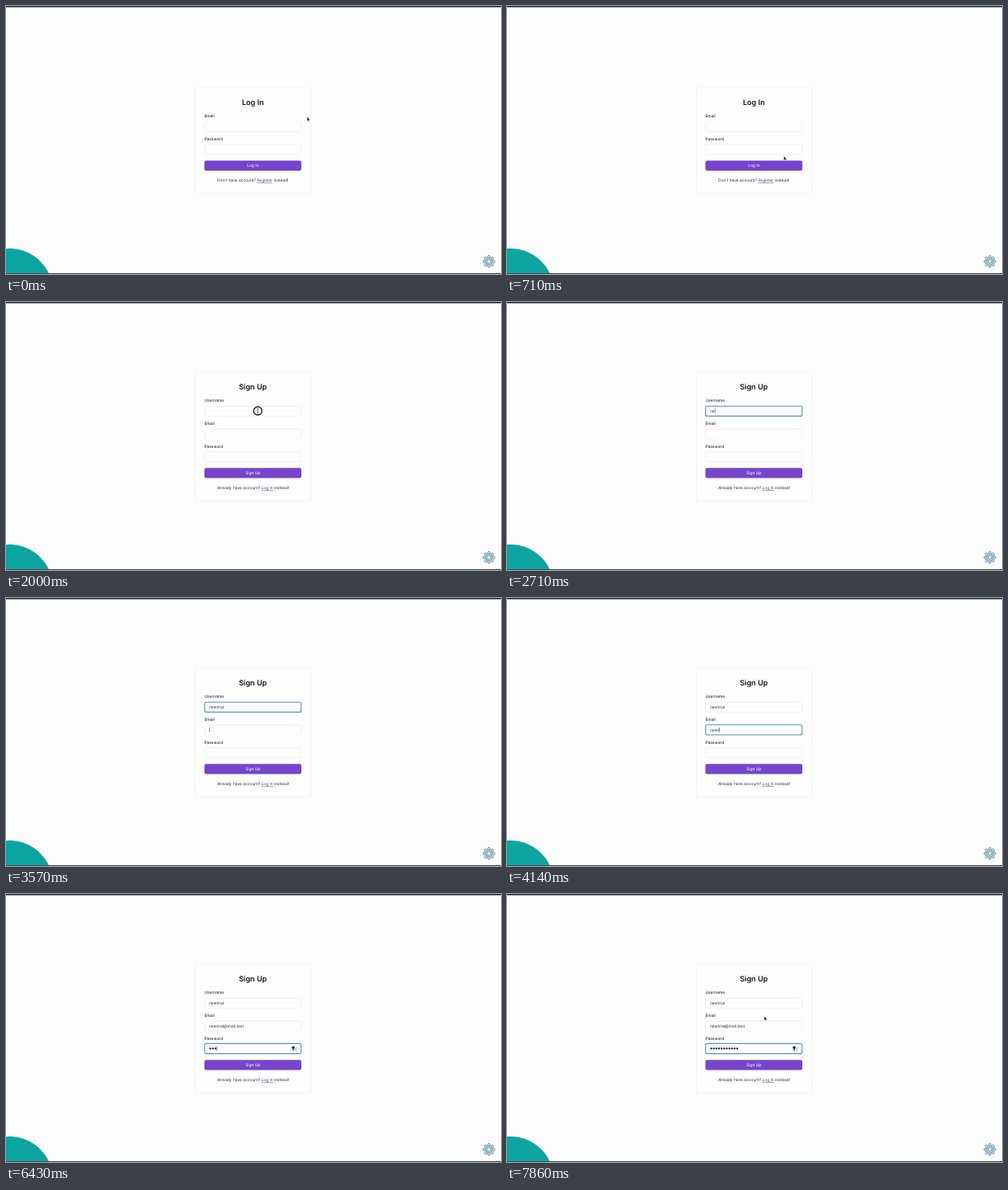
An HTML page that plays this animation: 600 px wide and 325 px high, repeating every 8000 ms.

```html
<!DOCTYPE html>
<html lang="en">
<head>
<meta charset="utf-8">
<title>Sign up form</title>
<style>
  html, body { margin: 0; width: 100%; height: 100%; overflow: hidden; background: #fefdfe; }
  svg { display: block; width: 100vw; height: 100vh; }
  text { font: 4.85px Inter, Roboto, sans-serif; fill: #2d2d38; text-rendering: geometricPrecision; }
  .title { font-size: 9px; font-weight: 600; fill: #17171c; text-anchor: middle; }
  .label { font-weight: 500; }
  .action { font-weight: 500; fill: #f4efff; text-anchor: middle; }
  .link { fill: #4c3a78; text-decoration: underline; }
  .card { fill: #fefefe; stroke: #f3f2f8; stroke-width: 1; }
  .field { fill: #fefefe; stroke: #eeeef3; stroke-width: .8; }
  .focus { fill: none; stroke: #5f96b5; stroke-width: 1.1; }
  .caret { fill: #333; }
</style>
</head>
<body>
<svg id="stage" viewBox="0 0 600 325" preserveAspectRatio="none">
  <rect width="600" height="325" fill="#fefdfe"/>
  <rect width="600" height="1.5" fill="#26252b"/>
  <circle cx="4" cy="347" r="53" fill="#0ca5a2"/>
  <rect y="324" width="600" height="1" fill="#4a4d52"/>
  <g transform="translate(585.3 309.8)" stroke="#66899a" stroke-width=".8" stroke-linejoin="round">
    <path id="gear" fill="#bfdfe8"/>
    <circle r="4.3" fill="#a9d2de"/>
    <circle r="2.3" fill="#fdfeff"/>
  </g>

  <g id="login"></g>
  <g id="signup"></g>

  <g id="key">
    <rect x="345" y="183.8" width="8" height="7" rx="1.5" fill="#e5e7ea"/>
    <circle cx="348.2" cy="186.2" r="1.6" fill="#25272b"/>
    <path d="M348.2 187V190" stroke="#25272b" stroke-width="1.1"/>
    <circle cx="351" cy="188.3" r=".7" fill="#92979d"/>
  </g>

  <path id="arrow" d="M0 0V5.2L1.2 4.1L2 5.9L2.9 5.5L2.1 3.8H3.7Z" fill="#111" stroke="#fff" stroke-width=".4"/>
  <path id="hand" d="M0 0Q.6-.7 1.2 0V2L3.4 2.6Q4 2.8 3.8 4L3.3 6H.7L-1.3 3.4Q-1.2 2.5 0 3.2Z"
        fill="#fff" stroke="#33303b" stroke-width=".6"/>
  <g id="beam" fill="none" stroke="#1c1c20">
    <circle r="5" stroke-width="1.3"/>
    <path d="M0-2.5V2.5M-.8-2.7H.8M-.8 2.7H.8" stroke-width=".7"/>
  </g>
</svg>
<script>
const LOOP = 8000;
const USERNAME = 'newtrial';
const EMAIL = 'newtrial@mail.test';
const $ = id => document.getElementById(id);
const clamp = v => Math.max(0, Math.min(1, v));
const ease = v => v * v * (3 - 2 * v);

// Piecewise interpolation through [time, value] points.
function track(points, t, shape = v => v) {
  if (t <= points[0][0]) return points[0][1];
  for (let i = 1; i < points.length; i++) {
    const [t0, a] = points[i - 1], [t1, b] = points[i];
    if (t < t1) return a + (b - a) * shape((t - t0) / (t1 - t0));
  }
  return points[points.length - 1][1];
}

function buildForm(id, top, title, labels, footer) {
  const height = 73 + labels.length * 27.6;
  const buttonY = top + 33.2 + labels.length * 27.6;
  let html = `<rect class="card" x="229.5" y="${top}" width="140" height="${height}" rx="2"/>
    <text class="title" x="299.2" y="${top + 20.9}">${title}</text>`;
  labels.forEach((label, i) => {
    const y = top + 27.6 * i;
    html += `<text class="label" x="240.4" y="${y + 36.2}">${label}</text>
      <rect class="field" x="240.7" y="${y + 41}" width="117" height="12.2" rx="2"/>
      <rect class="focus" x="240.7" y="${y + 41}" width="117" height="12.2" rx="2" opacity="0"/>
      <text class="value" x="246" y="${y + 49}"></text>
      <rect class="caret" width=".5" height="6" y="${y + 44}" opacity="0"/>`;
  });
  html += `<rect x="240.5" y="${buttonY}" width="117.5" height="12.4" rx="2" fill="#7645cb"/>
    <text class="action" x="299.3" y="${buttonY + 8}">${title}</text>
    <text x="256" y="${buttonY + 25.8}">${footer[0]} <tspan class="link">${footer[1]}</tspan> instead!</text>`;
  $(id).innerHTML = html;
}

buildForm('login', 99, 'Log In', ['Email', 'Password'], ["Don't have account?", 'Register']);
buildForm('signup', 85.2, 'Sign Up', ['Username', 'Email', 'Password'], ['Already have account?', 'Log In']);

const teeth = 8;
$('gear').setAttribute('d', 'M' + Array.from({ length: teeth * 4 }, (_, i) => {
  const angle = (i - 1.5) / (teeth * 4) * 2 * Math.PI;
  const radius = i % 4 === 1 || i % 4 === 2 ? 7.3 : 5.5;
  return [radius * Math.cos(angle), radius * Math.sin(angle)].map(n => n.toFixed(2));
}).join('L') + 'Z');

const parts = name => [...$('signup').querySelectorAll(name)];
const values = parts('.value'), rings = parts('.focus'), carets = parts('.caret');
const link = $('login').querySelector('.link');

const fields = [
  { from: 2080, to: 3500, typed: [[2400, 0], [3400, 8]], text: n => USERNAME.slice(0, n) },
  { from: 3500, to: 5650, typed: [[3650, 0], [4120, 4], [4280, 6], [4480, 6], [5400, 18]], text: n => EMAIL.slice(0, n) },
  { from: 5650, to: LOOP, typed: [[5950, 0], [6700, 5], [7500, 11]], text: () => '' }
];

// Password characters are drawn as evenly spaced dots.
const dots = Array.from({ length: 11 }, (_, i) => {
  const dot = document.createElementNS('http://www.w3.org/2000/svg', 'circle');
  dot.setAttribute('cx', 247.6 + 3.14 * i);
  dot.setAttribute('cy', 187.4);
  dot.setAttribute('r', 1.15);
  dot.setAttribute('fill', '#17171c');
  $('signup').append(dot);
  return dot;
});

const show = (el, on) => { el.style.display = on ? '' : 'none'; };

function drawFields(t) {
  fields.forEach((field, i) => {
    const count = Math.floor(track(field.typed, t) + .001);
    const text = field.text(count);
    if (values[i].textContent !== text) values[i].textContent = text;
    const fadeOut = field.to === LOOP ? 0 : clamp((t - field.to - 90) / 200);
    rings[i].setAttribute('opacity', clamp((t - field.from - 70) / 180) * (1 - fadeOut));
    const width = i === 2 ? 3.14 * count : text ? values[i].getComputedTextLength() : 0;
    carets[i].setAttribute('x', 246.2 + width);
    carets[i].setAttribute('opacity', t >= field.from && t < field.to && t < 7550 ? 1 : 0);
    if (i === 2) dots.forEach((dot, n) => show(dot, n < count));
  });
}

function drawPointer(t) {
  const x = track([[100, 365], [1140, 318.2], [1650, 318.2], [1950, 305.2], [7600, 305.2], [7850, 311.7]], t, ease);
  const y = track([[100, 134.5], [1140, 210], [1650, 210], [1950, 132], [7600, 132], [7850, 148.2]], t, ease);
  const shape = t < 1060 ? 'arrow' : t < 1700 ? 'hand' : t < 1900 ? 'arrow'
    : t < 2350 ? 'beam' : t < 7650 ? '' : 'arrow';
  for (const id of ['arrow', 'hand', 'beam']) {
    show($(id), id === shape);
    $(id).setAttribute('transform', `translate(${x} ${y})`);
  }
  link.style.fill = shape === 'hand' ? '#7650bd' : '';
}

function draw(now) {
  const t = now % LOOP;
  show($('login'), t < 1700);
  show($('signup'), t >= 1700);
  show($('key'), t >= 5750);
  drawFields(t);
  drawPointer(t);
  requestAnimationFrame(draw);
}
draw(0);
</script>
</body>
</html>
```
